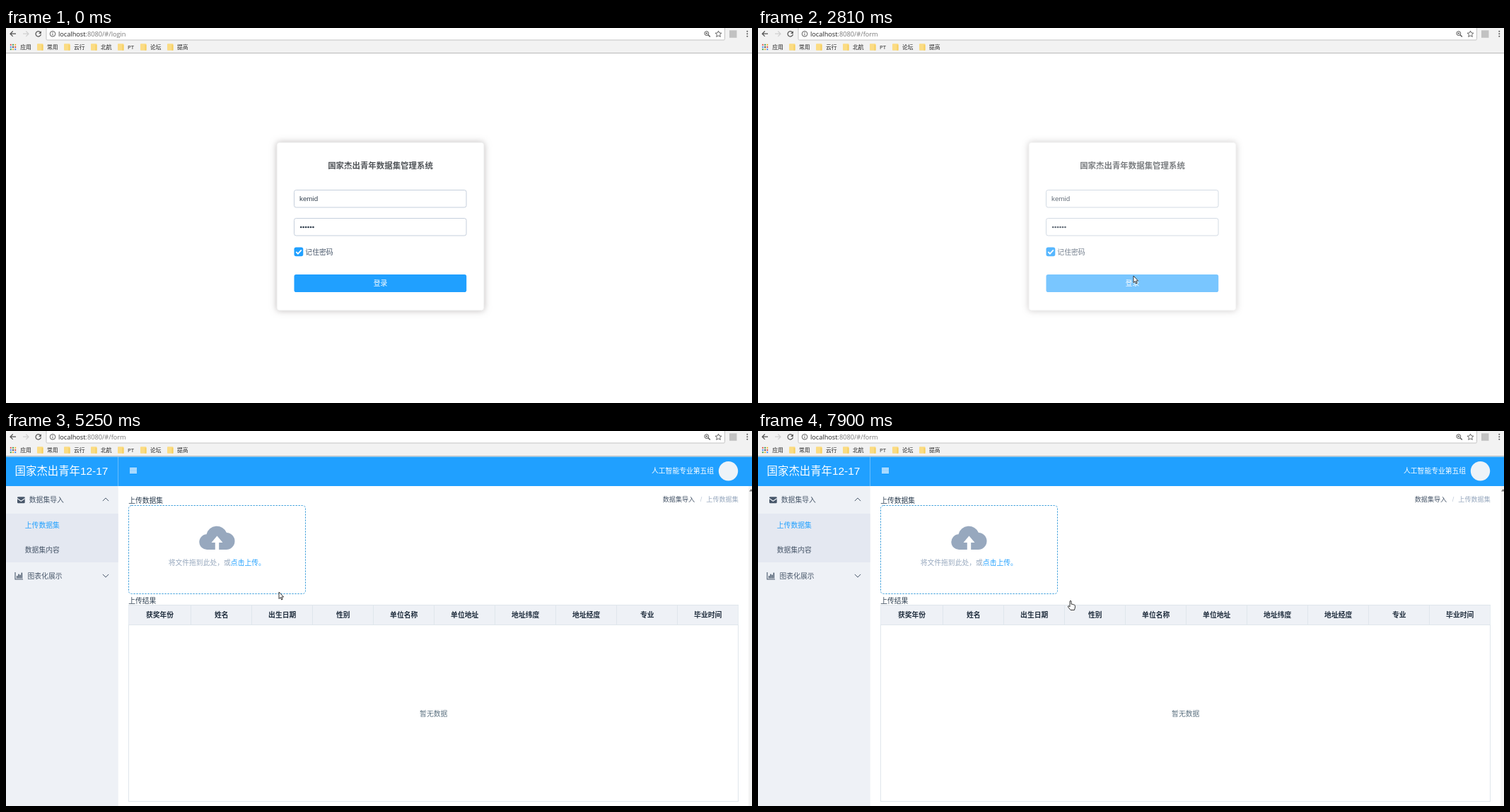
An HTML page for the animation above (8000 ms loop, 1055 by 531 pixels).

```html
<!DOCTYPE html>
<html lang="zh-CN">
<head>
<meta charset="utf-8">
<title>数据集管理系统</title>
<style>
html, body { margin: 0; width: 100%; height: 100%; overflow: hidden; background: #fff; }
svg { display: block; width: 1055px; height: 531px; }
text { font-family: "Liberation Sans", "Noto Sans CJK SC", sans-serif; white-space: pre; }
.ui text { font-family: "Open Sans", "Noto Sans CJK SC", sans-serif; }
</style>
</head>
<body>
<svg id="stage" viewBox="0 0 1055 531" xmlns="http://www.w3.org/2000/svg"></svg>
<script>
const BLUE = '#20a0ff', INK = '#48576a', MUTE = '#97a8be', LINE = '#dfe6ec', SEL = '#cce8ff';

// Markup helpers
const text = (x, y, size, str, fill = '#222', more = '') =>
  `<text x="${x}" y="${y}" font-size="${size}" fill="${fill}" ${more}>${str}</text>`;
const mid = (x, y, size, str, fill, more = '') =>
  text(x, y, size, str, fill, 'text-anchor="middle" ' + more);
const rect = (x, y, w, h, fill, more = '') =>
  `<rect x="${x}" y="${y}" width="${w}" height="${h}" fill="${fill}" ${more}/>`;
const box = (x, y, w, h, fill, stroke, more = '') =>
  rect(x + .5, y + .5, w - 1, h - 1, fill, `stroke="${stroke}" ${more}`);
const line = (d, stroke, width = 1, more = '') =>
  `<path d="${d}" fill="none" stroke="${stroke}" stroke-width="${width}" ${more}/>`;
const fill = (d, color, more = '') => `<path d="${d}" fill="${color}" ${more}/>`;
const dot = (x, y, r, color, more = '') => `<circle cx="${x}" cy="${y}" r="${r}" fill="${color}" ${more}/>`;
const group = (id, body, more = '') => `<g id="${id}" ${more}>${body}</g>`;
const down = (x, y, s, color, w = 1) => line(`M${x - s} ${y - s / 2}l${s} ${s}l${s} ${-s}`, color, w);
const up = (x, y, s, color, w = 1) => line(`M${x - s} ${y + s / 2}l${s} ${-s}l${s} ${s}`, color, w);
const right = (x, y, s, color, w = 1) => line(`M${x - s / 2} ${y - s}l${s} ${s}l${-s} ${s}`, color, w);
const left = (x, y, s, color, w = 1) => line(`M${x + s / 2} ${y - s}l${-s} ${s}l${s} ${s}`, color, w);
const tri = (x, y, color) => fill(`M${x - 2.5} ${y - 1.2}h5l-2.5 2.8z`, color);
const arrowLeft = (x, y, color) => line(`M${x + 4} ${y}h-8m3.7-3.7l-3.7 3.7l3.7 3.7`, color, 1.2);
const arrowRight = (x, y, color) => line(`M${x - 4} ${y}h8m-3.7-3.7l3.7 3.7l-3.7 3.7`, color, 1.2);
const folder = (x, y, w, h) => rect(x, y, w, h, '#fbdc84', 'rx=".8"') + rect(x + w - 2, y + 1.5, 2, h - 1.5, '#f6cf62');
const reload = (x, y, r, color) =>
  line(`M${x + r * .8} ${y - r * .6}A${r} ${r} 0 1 0 ${x + r} ${y + .6}`, color, 1.2) +
  fill(`M${x + r + .4} ${y - r - .4}v${r}h${-r}z`, color);

function browser() {
  let s = rect(0, 0, 1055, 36, '#f2f2f2') + rect(57, -3, 959.5, 20, '#fff', 'stroke="#c3c3c3" rx="1.5"') +
    rect(0, 35, 1055, 1, '#b9b9b9');
  s += arrowLeft(10, 8.2, '#505050') + arrowRight(28, 8.2, '#cfcfcf') + reload(45.7, 8.3, 3.7, '#505050');
  s += dot(66, 8.3, 3.8, 'none', 'stroke="#5a5a5a"') + rect(65.5, 7.8, 1, 2.6, '#5a5a5a') + rect(65.5, 6, 1, 1, '#5a5a5a');
  s += `<text x="74" y="11.6" font-size="9.2" fill="#222">localhost<tspan fill="#777">:8080/#/<tspan id="route"></tspan></tspan></text>`;
  s += dot(990.8, 7.6, 2.9, 'none', 'stroke="#555"') + line('M993 9.8l2.8 2.8', '#555', 1.4) + line('M989.3 7.6h3m-1.5-1.5v3', '#555', .8);
  s += fill('M1007.5 4l1.3 2.9l3.1.3l-2.3 2.1l.7 3.1l-2.8-1.6l-2.8 1.6l.7-3.1l-2.3-2.1l3.1-.3z', 'none', 'stroke="#555" stroke-width=".9"');
  s += rect(1023, 3.3, 10.5, 10.5, '#c2c2c2');
  for (const y of [4.8, 8.3, 11.8]) s += dot(1048.3, y, 1, '#555');
  const tint = ['#d9534a', '#4a8af4', '#3f9d58', '#555', '#f0b63a'];
  for (let i = 0; i < 9; i++) s += rect(5.8 + i % 3 * 3.2, 22.8 + (i / 3 | 0) * 3.2, 2, 2, tint[i * 2 % 5]);
  s += text(20.3, 30, 7.8, '应用');
  [[44, '常用'], [82, '云行'], [120, '北航'], [158, 'PT'], [190, '论坛'], [228, '提高']].forEach(([x, name]) => {
    s += folder(x, 22.2, 8.5, 9.5) + text(x + 14, 30, 7.8, name);
  });
  return group('browser', s, 'class="ui"');
}

function login() {
  let s = rect(383, 162, 293, 238, '#fff', 'rx="3.5" stroke="#eaeaea" filter="url(#glow)"');
  s += mid(529.5, 198.7, 11.45, '国家杰出青年数据集管理系统', '#505458', 'font-weight="bold"');
  s += box(407, 229, 244.5, 25.5, '#fff', '#c5cfdc', 'rx="2.8"') + text(415, 245, 9.8, 'kemid', '#33404f');
  s += box(407, 269, 244.5, 25.5, '#fff', '#c5cfdc', 'rx="2.8"');
  for (let i = 0; i < 6; i++) s += dot(417.2 + i * 3.45, 282, 1.35, '#33404f');
  s += rect(407.5, 310.5, 12.8, 12.8, BLUE, 'rx="2.8"') + line('M410.3 317l2.6 2.6l4.9-5.2', '#fff', 1.8);
  s += text(423.3, 320.6, 9.85, '记住密码', INK);
  s += rect(407.5, 349, 243.7, 25, BLUE, 'rx="2.8" id="submit"') + mid(529.5, 365.2, 9.8, '登录', '#fff');
  return group('login', s);
}

function app() {
  let s = rect(0, 36.5, 1055, 41.5, BLUE) + rect(158, 36.5, 1, 41.5, 'rgba(238,241,246,.35)');
  s += text(12.6, 62.2, 15.4, '国家杰出青年12-17', '#fff');
  for (let i = 0; i < 4; i++) s += rect(175, 52 + i * 2.2, 10, 1.3, '#fff');
  s += text(913, 60, 9.8, '人工智能专业第五组', '#fff') + dot(1021.5, 56.8, 13.7, '#edf3f8');

  s += rect(0, 78, 158.7, 453, '#eef1f6');
  s += rect(16, 93.2, 10.7, 9, INK, 'rx="1.2"') + line('M16 95.5l5.3 3.8l5.4-3.8', '#eef1f6', 1.1);
  s += text(32.8, 100.7, 9.8, '数据集导入', INK);
  s += group('fold', down(0, 0, 4.2, INK));
  s += rect(0, 117, 158.7, 69, '#e4e8f1', 'id="sub"');
  s += `<g clip-path="url(#subClip)">${text(26.8, 137, 9.8, '上传数据集', BLUE)}${text(26.8, 172, 9.8, '数据集内容', INK)}</g>`;
  let item = line('M13 14v10h11', INK, 1.1) + text(30.5, 22.7, 9.8, '图表化展示', INK) + down(141, 19, 4.2, INK);
  [3.5, 6, 5, 8].forEach((h, i) => item += rect(15 + i * 2.2, 22.6 - h, 1.5, h, INK));
  s += group('charts', item);

  s += text(173.2, 102.2, 9.8, '上传数据集', '#2c3e50');
  s += text(928.7, 100, 9.1, '数据集导入', INK) + text(981.8, 100, 9.1, '/', '#bfcbd9') + text(990.3, 100, 9.1, '上传数据集', MUTE);
  s += box(173, 105, 251, 126, '#fff', '#d9d9d9', 'rx="4" stroke-dasharray="2.4 1.6" id="zone"');
  s += fill('M285 168a10 10 0 0 1-1.5-21.8a15 15 0 0 1 28.5-2.2a12 12 0 0 1-1 24z', MUTE);
  s += fill('M298.5 148.5l8 9.5h-5.3v10h-5.4v-10h-5.3z', '#fff');
  s += text(229.7, 190, 9.8, `将文件拖到此处，或<tspan fill="${BLUE}">点击上传。</tspan>`, MUTE);
  s += text(173.2, 243.7, 9.8, '上传结果', '#2c3e50');

  s += box(173, 246, 863, 279, '#fff', LINE) + rect(173.5, 247, 862, 27, '#eef1f6') + rect(173, 274, 863, 1, LINE);
  ['获奖年份', '姓名', '出生日期', '性别', '单位名称', '单位地址', '地址纬度', '地址经度', '专业', '毕业时间'].forEach((name, i) => {
    const x = 175.3 + i * 86;
    if (i) s += rect(Math.round(x), 247, 1, 27, LINE);
    s += mid(i ? x + 43.4 : 217.5, 263.8, 9.8, name, '#1f2d3d', 'font-weight="bold"');
  });
  s += mid(604.7, 403.6, 9.8, '暂无数据', '#5e7382');
  s += rect(1050, 78, 5, 453, '#f3f3f3') + fill('M1051 85.5h4v-2.2l-1.5-1z', '#777');
  return group('app', s);
}

function sideList() {
  let s = rect(285, 365, 87, 13.5, '#d9d9d9');
  const star = 'M303 213l1.3 2.8l3 .3l-2.2 2l.6 3l-2.7-1.5l-2.7 1.5l.6-3l-2.2-2l3-.3z';
  s += fill(star, '#3a94dc') + text(310, 220.3, 7.8, '快速访问');
  ['下载', 'DuoCrate', '桌面', '文档', '图片', 'charts', 'dataset', '大作业', '数据集'].forEach((name, i) => {
    const y = 230.6 + i * 13.3;
    s += folder(304, y - 4, 6, 8) + text(315, y + 3, 7.8, name);
    if (i < 5) {
      s += rect(307.5, y, 4.5, 3.8, ['#2f83d0', '#2b5fb4', '#2f9bdc', '#8fb7d8', '#58a5d6'][i]);
      s += line(`M365 ${y + 3}l2-2m-1-2.6l3.2 3.2m-1.6-4.2l2.8 2.8m-3.2 .4l1.6-1.6`, '#888', 1.1);
    }
  });
  s += folder(299, 350, 6, 8) + text(310, 357.3, 7.8, 'DuoCrate');
  s += rect(300, 368, 7, 5, '#3d9be0') + rect(301.5, 374, 5, 1.2, '#6f8da6') + text(310, 375.2, 7.8, '此电脑');
  s += rect(300, 386, 7, 5, '#3d9be0') + text(310, 392.2, 7.8, '网络');
  return `<g clip-path="url(#listClip)">${s}</g>`;
}

function dialog() {
  const navy = '#1e395b', grey = '#6d6d6d';
  let s = box(284, 141, 522, 300, '#fff', '#2f86c9', 'filter="url(#drop)"');
  s += dot(294.5, 151, 4.5, '#dc4b3e') + text(302, 154.2, 7.9, '打开') + line('M792.5 148.3l5.4 5.4m0-5.4l-5.4 5.4', '#222');
  s += arrowLeft(296, 170.5, '#d2d2d2') + arrowRight(312, 170.5, '#d2d2d2') + down(325, 170.5, 1.6, '#c4c4c4');
  s += line('M337 174.5v-7.5m-3.3 3.3l3.3-3.3l3.3 3.3', '#444', 1.2);
  s += box(345, 163, 319, 15, '#fff', '#d9d9d9') + folder(348.5, 166, 6, 8) + text(360.5, 173, 8, '«', '#444');
  [[370.5, 'Beihang'], [416.3, '2018'], [448.8, 'data-analysis-chart'], [534, 'static'], [568.7, 'dataset']]
    .forEach(([x, name]) => s += text(x, 173.2, 8, name));
  for (const x of [409, 442, 527, 562]) s += right(x, 170.5, 1.7, '#444');
  s += down(647, 170.5, 2.2, '#555') + rect(652.5, 163, 1, 15, '#d9d9d9') + reload(658.3, 170.6, 2.4, '#555');
  s += box(671, 163, 128, 15, '#fff', '#d9d9d9') + text(675, 173.2, 7.8, '搜索"dataset"', grey);
  s += dot(791.5, 169.5, 2.2, 'none', 'stroke="#555"') + line('M790 171.2l-2.6 2.8', '#555', 1.2);

  s += rect(285, 181, 520, 20.5, '#f5f6f7') + text(295.7, 194, 7.8, '组织', navy) + tri(316, 190.7, navy) + text(337, 194, 7.8, '新建文件夹', navy);
  for (let i = 0; i < 3; i++) s += rect(731, 187 + i * 2.6, 2, 1.6, '#aaa') + rect(734, 187 + i * 2.6, 5, 1.3, '#bbb');
  s += tri(747, 190.7, '#222') + box(764, 187, 9, 7, '#fff', '#4b7fb0') + rect(769, 188, 3, 5, '#4f9bdd');
  s += dot(791, 190.4, 4.8, '#0b62b5') + mid(791, 193.3, 8, '?', '#fff', 'font-weight="bold"');

  s += sideList();
  s += rect(373, 202, 9.5, 187, '#f0f0f0') + rect(373, 211, 9.5, 134.5, '#cdcdcd') + up(377.7, 206.5, 2, '#555') + down(377.7, 384, 2, '#555');
  s += group('headHover', rect(387, 202, 329, 16.5, '#d9ebf9') + rect(706, 202, 1, 16.5, '#fff') + down(711, 210.3, 1.5, '#4a7fae', .8));
  s += up(554, 202.7, 2, '#777', .8) + text(396.7, 213.5, 7.8, '名称', '#4c607a') + text(719.8, 213.5, 7.8, '修改日期', '#4c607a');
  s += rect(715.5, 202, 1, 16.5, '#e5e5e5') + rect(801, 202, 1, 16.5, '#e5e5e5');
  s += rect(394, 223, 411, 13.3, '#e5f3ff', 'id="row0"') + rect(394, 236.3, 411, 13.4, SEL, 'id="row1"');
  const stem = '【第五组】国家自然科学基金杰出青年信息统计表';
  [[233, stem + '（12-17）-五组数据集汇总表.xlsx', '2018/5/25 1:11'], [246, stem + '-demo.xlsx', '2018/5/12 18:55']].forEach(([y, name, date]) => {
    s += rect(397.3, y - 7, 8, 8, '#23794a') + text(408.8, y, 7.76, name) + text(719.8, y, 7.76, date, grey);
  });
  s += rect(387, 378.5, 418, 10, '#f0f0f0') + rect(396, 378.5, 296, 10, '#cdcdcd') + left(391, 383.3, 2, '#333') + right(800, 383.3, 2, '#333');

  s += rect(285, 389, 520, 51.3, '#f0f0f0') + text(365.7, 408, 7.8, '文件名(N):');
  s += box(406, 397, 262, 16, '#fff', '#0078d7') + down(662, 405, 2, '#555') + rect(408, 399.5, 1, 11, '#000', 'id="caret"');
  s += text(406, 408, 7.76, stem + '-demo.xlsx', '#222', 'id="chosen"');
  s += box(675, 397, 120, 15.5, '#e4e4e4', '#adadad') + text(678, 408, 7.8, '所有文件') + down(789, 405, 2, '#555');
  s += rect(676.7, 416.7, 53.6, 14, '#e1e1e1', 'stroke="#0078d7" stroke-width="1.5"') + rect(720, 417, 1, 14, '#0078d7');
  s += mid(698, 427, 7.8, '打开(O)') + tri(725.6, 424, '#222') + box(739, 416, 56, 15.5, '#e1e1e1', '#adadad') + mid(767, 427, 7.8, '取消');
  for (let i = 0; i < 3; i++) s += line(`M${798 + i * 2} 439.5l${6 - i * 2} ${-6 + i * 2}`, '#bbb', .8);
  return group('dialog', s, 'class="ui"');
}

const cursors =
  group('arrow', fill('M0 0v9.6l2.2-2l1.5 3.4l1.5-.7l-1.5-3.3h2.9z', '#fff', 'stroke="#222" stroke-width=".9"')) +
  group('hand', fill('M-1 1q1-1.6 2 0v4.2q1.2-.7 1.9.4q1.3-.5 1.9.6q1.5-.3 1.6 1.2v2.6l-1 3.5h-5.4l-3.5-4.4q-.3-1.7 1.2-1.3l1.3 1.2z', '#fff', 'stroke="#222" stroke-width=".9"'));

const stage = document.getElementById('stage');
stage.innerHTML = `<defs>
  <filter id="glow" x="-20%" y="-20%" width="140%" height="140%"><feDropShadow dx="0" dy="0" stdDeviation="5" flood-color="#b9b5b5" flood-opacity=".9"/></filter>
  <filter id="drop" x="-10%" y="-10%" width="120%" height="120%"><feDropShadow dx="2" dy="2" stdDeviation="4" flood-opacity=".35"/></filter>
  <clipPath id="subClip"><rect id="subCut" x="0" y="117" width="159" height="69"/></clipPath>
  <clipPath id="listClip"><rect x="285" y="202" width="88" height="187"/></clipPath>
</defs>` + app() + login() + browser() + dialog() + group('cursor', cursors);

const el = {};
stage.querySelectorAll('[id]').forEach(n => el[n.id] = n);
const set = (id, name, value) => el[id].setAttribute(name, value);
const show = (id, on) => set(id, 'opacity', +on);

// Screen updates: first, last, count
const beats = [[150, 950, 10], [1030, 1760, 10], [1850, 2640, 10], [2720, 3070, 5], [3310, 3620, 4], [3830, 4310, 7],
  [4470, 4770, 4], [5050, 5830, 9], [5920, 6400, 7], [6560, 6560, 1], [6870, 7070, 3], [7900, 7900, 1]];
function snap(t) {
  let now = 0;
  for (const [a, b, n] of beats) {
    if (t < a) break;
    const gap = (b - a) / (n - 1) || 1;
    now = a + gap * Math.min(n - 1, Math.floor((t - a + 10) / gap));
  }
  return now;
}

// Linear interpolation over [time, ...values]
function track(keys, t) {
  let i = 0;
  while (i < keys.length - 1 && keys[i + 1][0] <= t) i++;
  const a = keys[i], b = keys[Math.min(i + 1, keys.length - 1)];
  const p = b === a ? 0 : Math.max(0, (t - a[0]) / (b[0] - a[0]));
  return a.slice(1).map((v, k) => v + (b[k + 1] - v) * p);
}
const path = [[150, 985, 518], [950, 610, 382], [1590, 539, 361], [1760, 539, 361], [2150, 540, 366], [2640, 531, 351],
  [3310, 531, 351], [3620, 506, 326], [3750, 506, 326], [4310, 344, 193], [4390, 344, 193], [4770, 377, 229],
  [5050, 386, 228], [5350, 386, 228], [5730, 394, 218.5], [5830, 395, 221], [6400, 442, 240]];
const loginFade = [[2720, 1], [3070, 0]];
const appFade = [[3310, .4], [3413, .75], [3517, .95], [3620, 1]];
const menu = [[3310, 11, 90], [3413, 37, 135], [3517, 61, 168], [3620, 69, 180]];
const popup = [[5330, .3, .94], [5440, .8, .985], [5530, 1, 1], [6800, 1, 1], [6870, .8, .99], [6970, .35, .96], [7060, 0, .95]];

function draw(time) {
  const t = snap(time);
  const within = (a, b) => t >= a && t < b;
  const [x, y] = track(path, t);

  el.route.textContent = t < 2720 ? 'login' : 'form';
  show('login', track(loginFade, t)[0]);
  set('submit', 'fill', within(2350, 2500) ? '#1d90e6' : t >= 1100 ? '#4db3ff' : BLUE);

  set('app', 'opacity', t < 3310 ? 0 : track(appFade, t)[0]);
  const [h, turn] = track(menu, t);
  set('sub', 'height', h);
  set('subCut', 'height', h);
  set('fold', 'transform', `translate(141 97) rotate(${turn})`);
  set('charts', 'transform', `translate(0 ${117 + h})`);
  set('zone', 'stroke', t >= 4140 ? '#3fa0dc' : '#d9d9d9');

  const open = within(5330, 7060);
  const [alpha, zoom] = track(popup, t);
  set('dialog', 'opacity', open ? alpha : 0);
  set('dialog', 'transform', `translate(545 291) scale(${zoom}) translate(-545 -291)`);
  show('headHover', within(5700, 5820));
  show('row0', within(5900, 6400) && y >= 223 && y < 236.3);
  show('row1', t >= 5900 && y >= 236.3);
  set('row1', 'fill', t >= 6560 ? SEL : '#e5f3ff');
  show('caret', within(5530, 6080));
  show('chosen', t >= 6560);

  const hand = within(1100, 2720) || within(4140, 5050) || t >= 7900;
  show('cursor', t >= 150);
  set('cursor', 'transform', `translate(${x} ${y})`);
  show('hand', hand);
  show('arrow', !hand);
}

const start = performance.now();
function tick() {
  draw((performance.now() - start) % 8000);
  requestAnimationFrame(tick);
}
tick();
</script>
</body>
</html>
```
